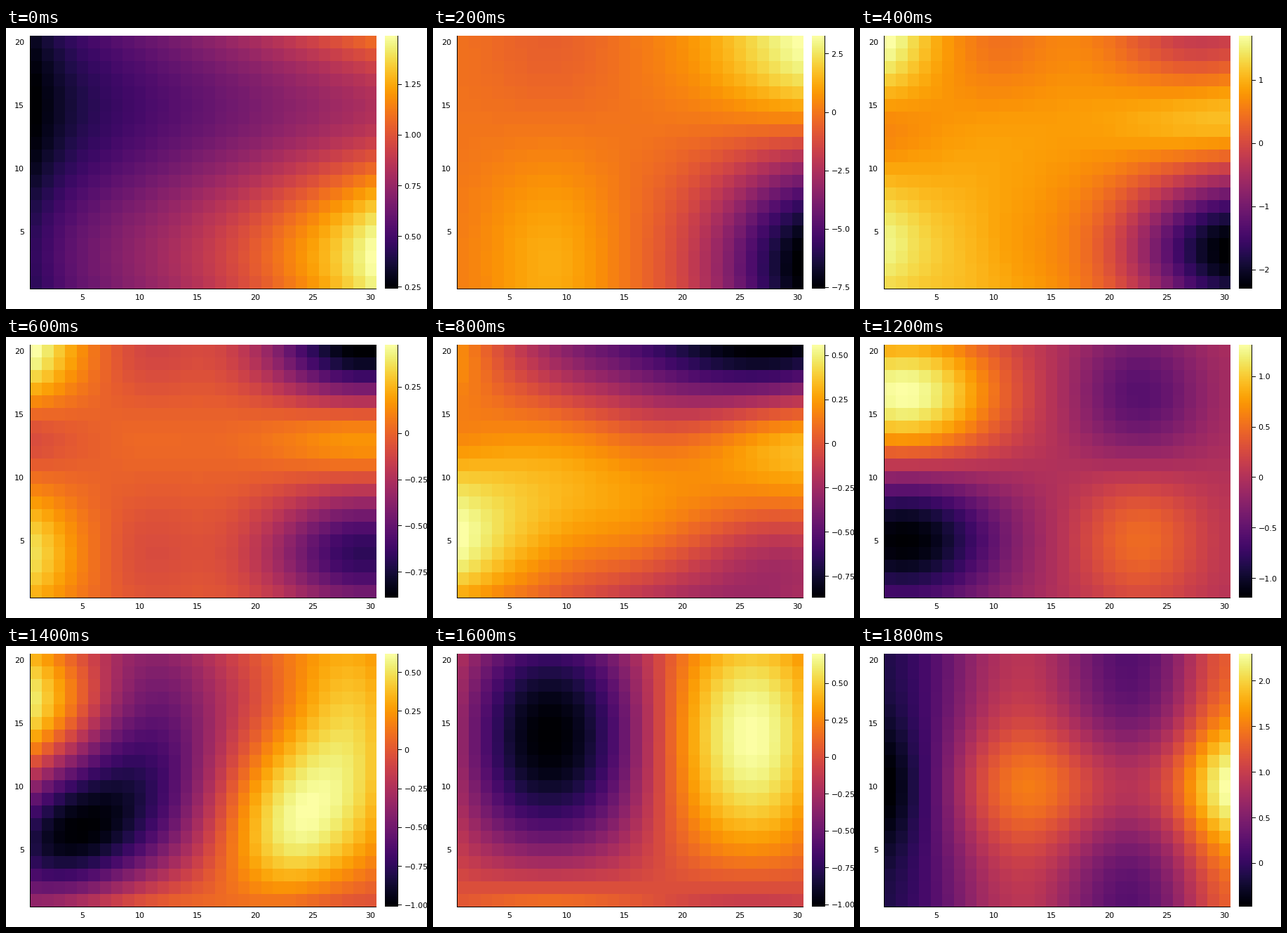
A matplotlib script for the animation above (2000 ms loop, 600 px wide and 400 px high).

```python
import numpy as np
import matplotlib.pyplot as plt
from matplotlib.animation import FuncAnimation

COLS, ROWS = 30, 20
LEFT, RIGHT, TOP, BOTTOM = 35, 528, 11, 371
BAR_LEFT, BAR_RIGHT = 540, 558
HAIR = 0.72  # one pixel in points

plt.rcParams["font.family"] = "DejaVu Sans"
plt.rcParams["font.size"] = 8

x = np.arange(1, COLS + 1)
y = np.arange(1, ROWS + 1)[:, None]
along = (x - 1) / (COLS - 1)


def bell(p, centre, width):
    return np.exp(-((p - centre) / width) ** 2 / 2)


def wave(p, peak, half):
    return np.cos(np.pi * (p - peak) / half)


def unit(field):
    return (field - field.min()) / np.ptp(field)


def slope():
    rise = .1 * np.tanh((x - 1) / 4) + .37 * along
    return rise + (.17 + .37 * along ** 2.5) * (1 + wave(y, 3, 12)) / 2


def saddle():
    across = bell(x, 33, 7.1) - .16 * bell(x, 8.5, 4.2)
    return across * (.46 * bell(y, 20, 5.6) - bell(y, 2.5, 6.4))


def bands():
    across = (.62 * bell(x, -1, 3.7) - .13 * bell(x, 11, 3)
              - bell(x, 29.5, 6))
    return across * (bell(y, 20.5, 3) + .75 * bell(y, 4, 3.4)
                     - .24 * bell(y, 13, 2))


def ridge():
    low = .44 - .44 * bell(x, 19.5, 6.4)
    high = 1 - .14 * bell(x, 19.5, 6)
    return low + (high - low) * wave(y, 8, 24.2) ** 1.3


def checks():
    across = bell(x, 2.2, 5.9) - .42 * bell(x, 22.6, 4)
    return across * (bell(y, 16.5, 4) - .9 * bell(y, 5.2, 4))


def wells():
    return -(.155 + .845 * wave(x, 8.5, 17.5)) * wave(y, 14, 24)


def humps():
    base = .05 + .41 * bell(x, 12.3, 5.5) + .55 * bell(x, 31, 4.5)
    lift = .25 * np.tanh((x - 4.5) / 6) + .14 * bell(x, 31, 2.5)
    return base + lift * bell(y, 10, 3.5)


def between(a, b):
    return lambda: unit(a()) + unit(b())


# field, lowest value, highest value, tick step
SCENES = [
    (slope, .243, 1.49, .25),
    (saddle, -7.55, 3.28, 2.5),
    (between(saddle, bands), -2.3, 1.7, 1),
    (bands, -.887, .478, .25),
    (between(bands, ridge), -.87, .56, .25),
    (ridge, -3.19, -.46, .5),
    (checks, -1.19, 1.314, .5),
    (between(checks, wells), -1.01, .62, .25),
    (wells, -1.012, .70, .25),
    (humps, -.475, 2.30, .5),
]

fig = plt.figure(figsize=(6, 4), dpi=100, facecolor="white")
ax = fig.add_axes([0, 0, 1, 1])
ax.axis("off")


def line(xs, ys):
    return ax.plot(xs, ys, color="black", lw=HAIR, solid_capstyle="butt",
                   snap=False)[0]


def label(px, py, text, align):
    return ax.text(px, py, text, ha=align, va="center_baseline")


def image(data, left, right):
    return ax.imshow(data, cmap="inferno", vmin=0, vmax=1, origin="lower",
                     extent=(left, right, BOTTOM, TOP), aspect="auto",
                     interpolation="nearest")


heat = image(unit(slope()), LEFT, RIGHT)
image(np.linspace(0, 1, 256)[:, None], BAR_LEFT, BAR_RIGHT)
ax.set_xlim(0, 600)
ax.set_ylim(400, 0)

line([LEFT - .5] * 2, [TOP, BOTTOM + 1])
line([LEFT - 1, RIGHT], [BOTTOM + .5] * 2)
line([BAR_RIGHT + .5] * 2, [TOP, BOTTOM])
for n in range(5, COLS + 1, 5):
    label(LEFT - .5 + (n - .5) * (RIGHT - LEFT) / COLS, 383, str(n), "center")
for n in range(5, ROWS + 1, 5):
    label(26.3, BOTTOM + .5 - (n - .5) * (BOTTOM - TOP) / ROWS, str(n),
          "right")

ticks = [(line([BAR_RIGHT, 564], [0, 0]), label(567.4, 0, "", "left"))
         for _ in range(7)]


def tick_text(value, step):
    if value == 0:
        return "0"
    digits = len(f"{step:g}".partition(".")[2])
    return f"{value:.{digits}f}".replace("-", "\u2212")


def draw(frame):
    field, low, high, step = SCENES[frame]
    heat.set_data(unit(field()))
    values = np.arange(np.ceil(low / step), np.floor(high / step) + 1) * step
    for i, (mark, text) in enumerate(ticks):
        shown = i < len(values)
        mark.set_visible(shown)
        text.set_visible(shown)
        if shown:
            level = BOTTOM - (values[i] - low) / (high - low) * (BOTTOM - TOP)
            mark.set_ydata([np.floor(level) + .5] * 2)
            text.set_y(level)
            text.set_text(tick_text(values[i], step))
    return [heat]


anim = FuncAnimation(fig, draw, frames=len(SCENES), interval=200,
                     init_func=lambda: draw(0), repeat=True, repeat_delay=0)
plt.show()
```
